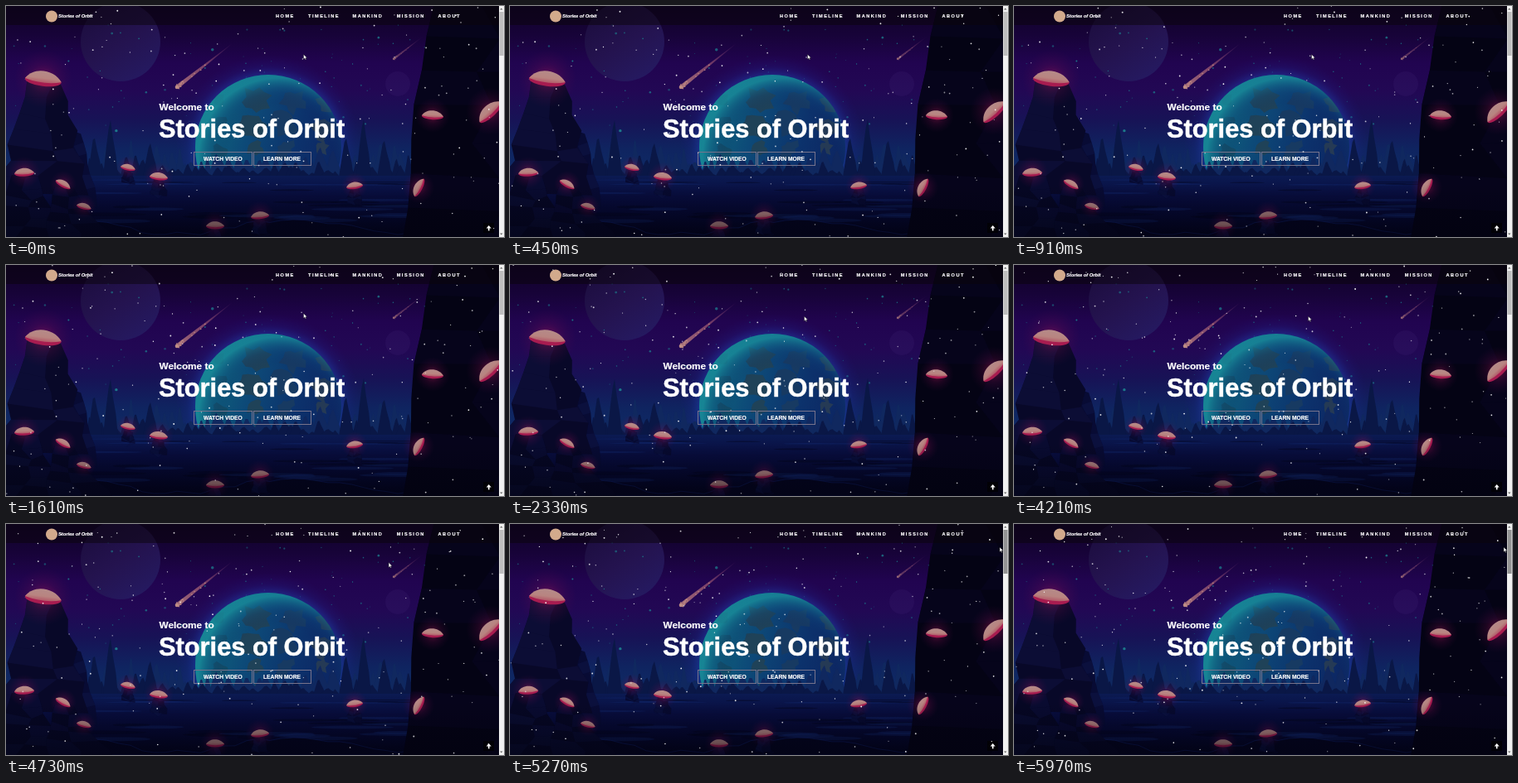
Write an HTML page with a canvas that moves like this. It is 600 px wide and 279 px high and loops after 6000 ms.

```html
<!DOCTYPE html>
<html lang="en">
<head>
<meta charset="utf-8">
<title>Stories of Orbit</title>
<style>
html, body { margin: 0; width: 100%; height: 100%; overflow: hidden; background: #080318; }
canvas, svg { position: absolute; left: 0; top: 0; width: 600px; height: 279px; display: block; }
text { font-family: "Liberation Sans", Arial, sans-serif; font-weight: 700; fill: #fff; stroke: #fff; stroke-width: .2px; }
.nav { font-size: 5.6px; letter-spacing: 1.5px; }
.btn { font-size: 6.7px; }
</style>
</head>
<body>
<canvas id="scene" width="600" height="279"></canvas>
<svg viewBox="0 0 600 279">
  <circle cx="55" cy="12.5" r="7" fill="#d2aa8c"/>
  <text x="63" y="14.2" font-size="5.7" font-style="italic">Stories of Orbit</text>
  <g class="nav">
    <text x="325" y="13.8">HOME</text>
    <text x="364" y="13.8">TIMELINE</text>
    <text x="417.5" y="13.8">MANKIND</text>
    <text x="470.7" y="13.8">MISSION</text>
    <text x="520.5" y="13.8">ABOUT</text>
  </g>
  <text x="184.6" y="126.3" font-size="11.8">Welcome to</text>
  <text x="184" y="158.8" font-size="30.8" style="stroke-width:.5px">Stories of Orbit</text>
  <g fill="none" stroke="#77738c">
    <rect x="226.5" y="176.5" width="70" height="16"/>
    <rect x="298.5" y="176.5" width="69" height="16"/>
  </g>
  <g class="btn">
    <text x="238" y="187">WATCH VIDEO</text>
    <text x="310" y="187">LEARN MORE</text>
  </g>
</svg>
<canvas id="top" width="600" height="279"></canvas>
<script>
const W = 600, H = 279, PAGE = 594, LOOP = 6000, HORIZON = 207;
const bg = document.getElementById('scene').getContext('2d');
const fg = document.getElementById('top').getContext('2d');

function random(seed) {
  return () => {
    seed = (seed * 1664525 + 1013904223) >>> 0;
    return seed / 4294967296;
  };
}

const mix = (a, b, k) => a + (b - a) * k;
const wrap = (v, n) => ((v % n) + n) % n;

function poly(c, color, pts) {
  c.fillStyle = color;
  c.beginPath();
  pts.forEach(p => c.lineTo(p[0], p[1]));
  c.closePath();
  c.fill();
}

function oval(c, color, x, y, rx, ry = rx) {
  c.fillStyle = color;
  c.beginPath();
  c.ellipse(x, y, rx, ry, 0, 0, 7);
  c.fill();
}

function stops(g, colors) {
  colors.forEach((s, i) => g.addColorStop(i / (colors.length - 1), s));
  return g;
}

const fade = (x0, y0, x1, y1, ...colors) => stops(bg.createLinearGradient(x0, y0, x1, y1), colors);
const halo = (x, y, r0, r1, ...colors) => stops(bg.createRadialGradient(x, y, r0, x, y, r1), colors);

function sky() {
  bg.fillStyle = fade(0, 0, 0, HORIZON, '#10022a', '#170338', '#210450', '#220854', '#171356', '#0f2460', '#0e2c66');
  bg.fillRect(0, 0, W, HORIZON);
  oval(bg, fade(110, 0, 165, 90, '#1c0d3e', '#24134f', '#251a62'), 138, 43, 48);
  oval(bg, 'rgba(60,30,110,.25)', 472, 94, 15);
  const r = random(41);
  for (let i = 0; i < 100; i++) {
    bg.globalAlpha = .4 + r() * .5;
    oval(bg, '#1d8290', r() * PAGE, 20 + r() * 140, .5 + r() * r() * 1.3);
  }
  bg.globalAlpha = 1;
}

// Grainy streak, densest and widest at the head
function comet(hx, hy, tx, ty, size, alpha) {
  const r = random(9);
  bg.globalAlpha = alpha;
  poly(bg, fade(hx, hy, tx, ty, '#a06a78', '#7a4068', 'rgba(80,35,95,.3)'),
    [[hx - size * .6, hy - size * .8], [tx, ty], [hx + size * .6, hy + size * .8]]);
  for (let i = 0; i < 22; i++) {
    const k = r() * r() * .6, s = size * 2 * (1 - k);
    oval(bg, '#b98580', mix(hx, tx, k) + (r() - .5) * s, mix(hy, ty, k) + (r() - .5) * s, size * .3);
  }
  oval(bg, '#bd8c84', hx, hy, size * .9);
  bg.globalAlpha = 1;
}

function blob(r, x, y, size, color) {
  const pts = [];
  for (let a = 0; a < 6.28; a += .5) {
    const d = size * (.5 + r() * .7);
    pts.push([x + Math.cos(a) * d, y + Math.sin(a) * d]);
  }
  poly(bg, color, pts);
}

function planet() {
  const x = 316, y = 171, r = 88, rnd = random(12);
  oval(bg, halo(x, y, r - 4, r + 24, 'rgba(30,70,180,.6)', 'rgba(30,40,150,.2)', 'rgba(30,20,120,0)'), x, y, r + 24);
  bg.save();
  bg.beginPath();
  bg.arc(x, y, r, 0, 7);
  bg.clip();
  bg.fillStyle = fade(x - r, y - 20, x + r, y + 30, '#0f6a7c', '#0d4a78', '#0c326c', '#0d2360');
  bg.fillRect(x - r, y - r, 2 * r, 2 * r);
  for (let i = 0; i < 16; i++)
    blob(rnd, x - 62 + i % 4 * 40 + rnd() * 12, y - 62 + (i >> 2) * 30 + rnd() * 10, 8 + rnd() * 11,
      ['#124c66', '#1f4258', '#173a62', '#253a55'][i % 4]);
  bg.fillStyle = halo(x + 12, y + 12, 60, r + 8, 'rgba(10,30,90,0)', 'rgba(15,75,125,.25)', 'rgba(25,140,155,.8)');
  bg.fillRect(x - r, y - r, 2 * r, 2 * r);
  bg.restore();
}

function spire(r, x, top, width, color) {
  const h = HORIZON - top;
  poly(bg, color, [[x - width, HORIZON], [x - width * .6, top + h * .5], [x - width * .25, top + h * .15 * r()],
    [x, top], [x + width * .3, top + h * .3], [x + width * .7, top + h * .6], [x + width, HORIZON]]);
}

function land() {
  const r = random(18);
  for (const [color, tall, low] of [['#10285f', 32, 14], ['#0a1746', 24, 5]])
    for (let x = 70; x < 500; x += 9) {
      const edge = Math.min(1, Math.abs(x - 285) / 130);
      spire(r, x + r() * 6, HORIZON - low - r() * tall * (.3 + edge * .7), 5 + r() * 7, color);
    }
  for (const [x, top] of [[126, 138], [107, 160], [174, 166], [410, 160], [431, 137], [456, 163]])
    spire(r, x, top, 9, '#0a1746');

  bg.fillStyle = fade(0, HORIZON - 2, 0, H, '#0b1a52', '#080d3e', '#050830', '#03041c');
  bg.fillRect(0, HORIZON - 2, W, H);
  for (let i = 0; i < 34; i++) {
    const k = r();
    oval(bg, i % 2 ? 'rgba(18,40,110,.4)' : 'rgba(3,5,30,.45)', 100 + r() * 400, HORIZON + 3 + k * 55, 15 + r() * 45, .6 + k * 2);
  }
  const shore = [[70, H]];
  for (let x = 80; x <= 500; x += 14) shore.push([x, 264 - 9 * Math.sin(x / 44) + r() * 5]);
  poly(bg, '#040520', [...shore, [510, H]]);
  bg.strokeStyle = 'rgba(20,40,125,.6)';
  bg.lineWidth = .8;
  bg.stroke();
}

// Faceted rock tapering from a top edge to a base edge
function crag(seed, [l0, r0, top], [l1, r1, base], dark, light) {
  const r = random(seed), n = 7, left = [], right = [], mid = [];
  for (let i = 0; i <= n; i++) {
    const k = i / n, y = mix(top, base, k), a = mix(l0, l1, k), b = mix(r0, r1, k), j = (b - a) * .15;
    left.push([a + (r() - .5) * j, y]);
    right.push([b + (r() - .5) * j, y + r() * 5]);
    mid.push([mix(a, b, .3 + r() * .4), y + r() * 8]);
  }
  poly(bg, dark, [...left, ...right.slice().reverse()]);
  bg.globalAlpha = .6;
  for (let i = 0; i < n; i++) {
    const side = r() < .5 ? left : right;
    poly(bg, light, [side[i], mid[i], mid[i + 1], side[i + 1]]);
  }
  bg.globalAlpha = 1;
}

// Glowing cap on its own small rock: x, y, half width, tilt
function cap([x, y, w, turn]) {
  const h = w * .38;
  oval(bg, halo(x, y, 0, w * 1.6, 'rgba(190,20,85,.5)', 'rgba(130,15,80,.2)', 'rgba(90,10,70,0)'), x, y, w * 1.6);
  bg.save();
  bg.translate(x, y);
  bg.rotate(turn);
  oval(bg, '#a81c50', 0, h * .25, w, h * .8);
  bg.fillStyle = fade(0, -h, 0, h * .8, '#b58a88', '#b88480', '#b0475f');
  bg.beginPath();
  bg.moveTo(-w, h * .2);
  bg.bezierCurveTo(-w * .6, -h * 1.7, w * .6, -h * 1.5, w, h * .2);
  bg.quadraticCurveTo(0, h * .9, -w, h * .2);
  bg.fill();
  bg.restore();
}

function rocks() {
  const caps = [[45, 88, 22, .12], [22, 201, 12, -.05], [69, 215, 10, .5], [94, 242, 9, .25], [147, 195, 9, .2],
    [184, 206, 11, .1], [252, 265, 11, 0], [306, 253, 11, -.1], [420, 217, 10, -.15], [497, 219, 12, -1.1],
    [514, 132, 13, .05], [583, 127, 18, -.75]];
  caps.forEach(([x, y, w], i) => crag(i + 5, [x - w * .4, x + w * .4, y], [x - w, x + w, y + w * 2], '#070a30', '#0b1242'));
  crag(3, [78, 90, 150], [66, 112, 240], '#080b34', '#0d1444');
  crag(8, [27, 68, 91], [-8, 100, 225], '#080828', '#10123f');
  crag(21, [8, 40, 204], [-20, 66, 290], '#060724', '#0c0f3a');
  crag(30, [60, 80, 218], [44, 135, 290], '#060724', '#0b0e38');
  crag(14, [522, 660, -5], [476, 660, 285], '#040314', '#070620');
  caps.forEach(cap);
}

function chrome() {
  bg.fillStyle = fade(0, 215, 0, H, 'rgba(2,2,15,0)', 'rgba(2,2,15,.55)');
  bg.fillRect(0, 215, W, 64);
  bg.fillStyle = 'rgba(10,4,10,.5)';
  bg.fillRect(0, 0, PAGE, 23);
  bg.fillStyle = '#020106';
  bg.fillRect(575, 262, 13, 12);
}

function scrollbar(hover) {
  fg.fillStyle = '#f1f1f1';
  fg.fillRect(PAGE, 0, 6, H);
  fg.fillStyle = hover ? '#929292' : '#bdbdbd';
  fg.fillRect(PAGE + .5, 7, 5, 53);
  poly(fg, '#666', [[595, 4.5], [598.5, 4.5], [596.8, 2.5]]);
  poly(fg, '#666', [[595, 274.5], [598.5, 274.5], [596.8, 276.5]]);
  poly(fg, '#fff', [[581.7, 265], [584.7, 268.4], [578.7, 268.4]]);
  fg.fillRect(580.9, 268, 1.6, 3.4);
}

const rnd = random(2024);
const dots = Array.from({ length: 165 }, () => ({
  x: rnd() * PAGE, y: rnd() * H,
  vx: (rnd() - .5) * 16, vy: (rnd() - .5) * 16,
  r: .5 + rnd() * .45, a: .5 + rnd() * .5
}));

function particles(t) {
  for (const d of dots) {
    fg.globalAlpha = d.a;
    oval(fg, '#fff', wrap(d.x + d.vx * t / 1000, PAGE), wrap(d.y + d.vy * t / 1000, H), d.r);
  }
  fg.globalAlpha = 1;
}

function ease(t, start, end) {
  const k = Math.max(0, Math.min(1, (t - start) / (end - start)));
  return k * k * (3 - 2 * k);
}

function pointer(t) {
  const a = ease(t, 1650, 1950), b = ease(t, 4450, 5050);
  fg.save();
  fg.translate(358.5 - 4 * a + 235.5 * b, 58.5 + 3.5 * a - 34 * b);
  poly(fg, '#fff', [[0, 0], [0, 5.8], [1.4, 4.6], [2.3, 6.5], [3.2, 6.1], [2.3, 4.2], [4.1, 4.1]]);
  fg.strokeStyle = '#111';
  fg.lineWidth = .4;
  fg.stroke();
  fg.restore();
}

function frame(now) {
  const t = now % LOOP;
  fg.clearRect(0, 0, W, H);
  particles(t);
  scrollbar(t > 5020);
  pointer(t);
  requestAnimationFrame(frame);
}

sky();
comet(206, 98, 273, 45, 2.6, 1);
comet(467, 64, 502, 37, 1.4, .55);
planet();
land();
rocks();
chrome();
frame(performance.now());
</script>
</body>
</html>
```
